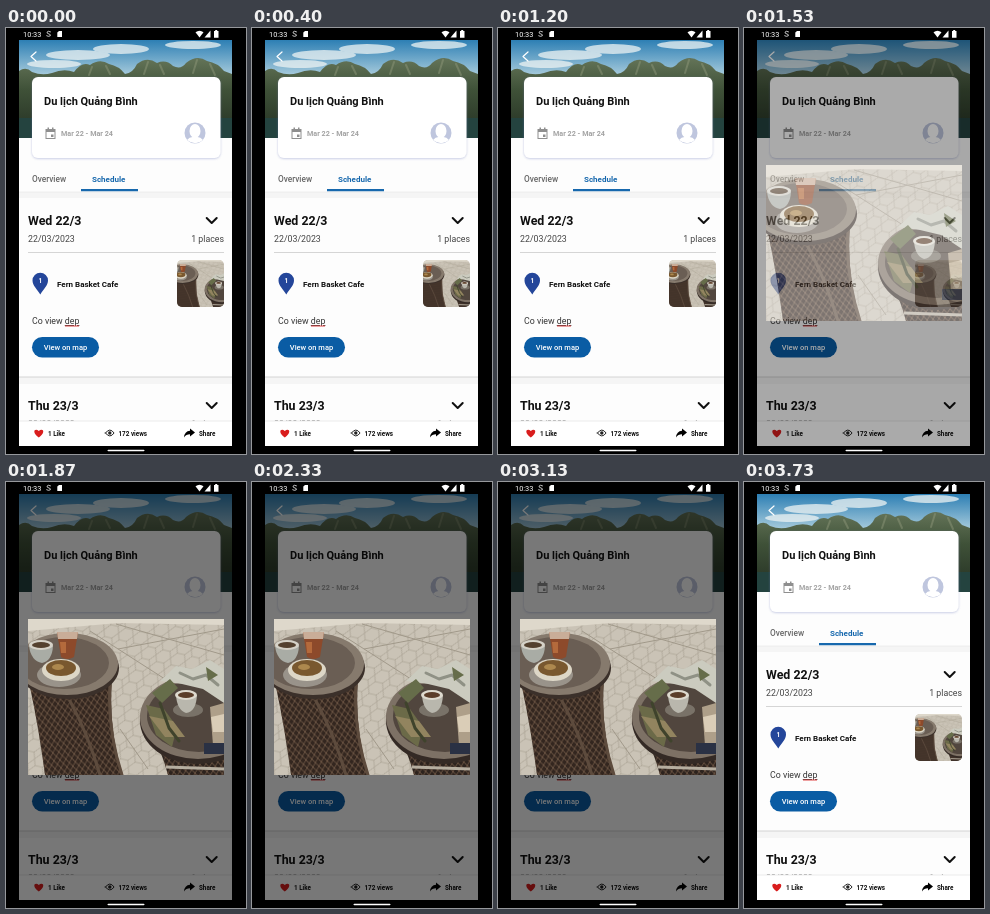
These frames come from a looping animation (240 by 426 pixels, 3.79 s). An HTML page:

```html
<!DOCTYPE html>
<html lang="vi">
<head>
<meta charset="utf-8">
<title>Trip schedule</title>
<style>
  html, body { margin: 0; width: 100%; height: 100%; overflow: hidden; background: #000; }
  svg { display: block; }
  body > svg { width: 100vw; height: 100vh; }
  text { font-family: Roboto, sans-serif; fill: #111; }
  .bold { font-weight: 700; }
  .gray { fill: #666; }
  .line { fill: none; stroke-linecap: round; stroke-linejoin: round; }
</style>
</head>
<body>
<svg viewBox="0 0 240 426">
  <defs>
    <linearGradient id="sky" x2="0" y2="1">
      <stop stop-color="#2d7fb4"/><stop offset=".4" stop-color="#b4d3e0"/>
    </linearGradient>
    <linearGradient id="hill" x2="0" y2="1">
      <stop stop-color="#647458"/><stop offset=".4" stop-color="#3f5138"/><stop offset="1" stop-color="#232f22"/>
    </linearGradient>
    <filter id="shadow" x="-10%" y="-10%" width="120%" height="125%">
      <feDropShadow dx="0" dy=".7" stdDeviation="1" flood-color="#7480c0" flood-opacity=".45"/>
    </filter>
    <pattern id="tiles" width="16" height="12" patternUnits="userSpaceOnUse" patternTransform="skewX(-18) rotate(12)">
      <path d="M0 6L4 0H12L16 6L12 12H4Z" fill="none" stroke="#a39b8c" stroke-width=".6"/>
    </pattern>
    <pattern id="weave" width="6" height="8" patternUnits="userSpaceOnUse" patternTransform="rotate(-8)">
      <path d="M0 0L6 8M6 0L0 8" stroke="#6b5443" stroke-width="1"/>
    </pattern>
    <symbol id="photo" viewBox="0 0 196 156" preserveAspectRatio="xMidYMid slice">
      <path d="M0 0H196V156H0Z" fill="#cac3b6"/>
      <path d="M0 0H196V156H0Z" fill="url(#tiles)"/>
      <path d="M0 0H196V6L90 4L0 12Z" fill="#ded8cb"/>
      <path d="M88 5L196 36M62 12L140 62M90 30L196 10M92 110L120 150" stroke="#a1998a" fill="none"/>

      <path d="M2 68Q11 110 17 156H95Q80 112 84 58Z" fill="#33261f"/>
      <path d="M2 68Q11 110 17 156H95Q80 112 84 58Z" fill="url(#weave)"/>
      <path d="M42 82Q60 115 72 156M82 66Q79 110 94 156" class="line" stroke="#5d4b3d" stroke-width="3"/>
      <ellipse cx="40" cy="49" rx="51" ry="31" fill="#3b302a"/>
      <ellipse cx="39" cy="45" rx="51" ry="31" fill="#867a6d"/>
      <ellipse cx="36" cy="44" rx="45" ry="26" fill="#6a5e54"/>
      <path d="M1 27H25Q24 42 14 44Q3 42 1 27Z" fill="#a9aca5"/>
      <ellipse cx="13" cy="26" rx="12" ry="5" fill="#d5d2c8"/><ellipse cx="13" cy="26" rx="9" ry="3" fill="#54412f"/>
      <path d="M29 13H50L46 38Q39 42 33 38Z" fill="#8d4a2b"/>
      <path d="M29 13H50L49 20H30Z" fill="#c9ad98"/><path d="M32 23H38V34H33Z" fill="#b46a3c"/>
      <ellipse cx="31" cy="56" rx="22" ry="12" fill="#99938a"/>
      <ellipse cx="33" cy="51" rx="19" ry="11" fill="#ddd7c7"/>
      <ellipse cx="33" cy="49" rx="15" ry="8" fill="#79582f"/><ellipse cx="30" cy="48" rx="6" ry="3" fill="#ad884e"/>

      <path d="M122 112Q134 132 140 156H196V105Z" fill="#2d231e"/>
      <path d="M122 112Q134 132 140 156H196V105Z" fill="url(#weave)"/>
      <ellipse cx="170" cy="102" rx="58" ry="43" fill="#342a25"/>
      <ellipse cx="170" cy="98" rx="58" ry="42" fill="#7d7165"/>
      <ellipse cx="171" cy="97" rx="52" ry="36" fill="#51463e"/>
      <path d="M132 62L148 47L164 50L182 41L196 50V84L175 70L154 65Z" fill="#cbcbbf"/>
      <path d="M152 54L165 60L178 56L190 66" class="line" stroke="#8f9185" stroke-width="3"/>
      <path d="M124 74L142 60L150 69L134 84ZM178 48L190 56L180 62Z" fill="#666d4a"/>
      <path d="M118 86L136 90L149 108L144 128L128 116Z" fill="#6b6a48"/>
      <path d="M121 97L145 102L157 118L137 118Z" fill="#92845f"/>
      <path d="M132 84L141 109L151 122" class="line" stroke="#3f432c" stroke-width="3"/>
      <ellipse cx="160" cy="91" rx="15" ry="7" fill="#797268"/>
      <path d="M148 76H169Q168 93 158 94Q149 91 148 76Z" fill="#b9b7ad"/>
      <ellipse cx="158" cy="76" rx="11" ry="5" fill="#dedacf"/><ellipse cx="158" cy="76" rx="8" ry="3" fill="#5b3d29"/>
      <path d="M182 88L196 84V126H185Z" fill="#ae9f89"/><path d="M183 98L196 95V113H185Z" fill="#dacdb7"/>
      <path d="M176 124H196V135H176Z" fill="#2a3144"/>
      <path d="M138 148L196 150" stroke="#b6aea0" stroke-width="3"/>
    </symbol>
    <clipPath id="header"><path d="M13 12H226V110H13Z"/></clipPath>
    <clipPath id="thumb"><rect x="171" y="232" width="47" height="47" rx="5"/></clipPath>
    <path id="chevron" class="line" d="M-5 -2.5L0 2.5L5 -2.5" stroke="#111" stroke-width="2"/>
  </defs>

  <path d="M0 0H240V426H0Z"/>
  <path d="M13 12H226V418H13Z" fill="#fdfdfd"/>

  <g clip-path="url(#header)">
    <path d="M13 12H226V110H13Z" fill="url(#sky)"/>
    <g fill="#edf3f3" opacity=".75">
      <ellipse cx="72" cy="27" rx="32" ry="5"/><ellipse cx="115" cy="21" rx="28" ry="5"/>
      <ellipse cx="48" cy="36" rx="27" ry="4"/><ellipse cx="187" cy="17" rx="28" ry="4"/>
    </g>
    <path d="M13 43Q20 38 26 44Q36 48 46 45Q58 40 68 44Q76 33 84 37Q94 30 103 36Q113 38 119 46Q127 45 131 36Q141 28 151 35Q160 31 167 38Q175 42 180 35Q191 26 201 33Q212 35 218 43L226 46V110H13Z" fill="url(#hill)"/>
    <path d="M86 39L83 47M100 38L104 46M142 34L138 46M154 37L158 46M191 32L187 45M204 36L209 47" class="line" stroke="#99a083" stroke-width="2" opacity=".4"/>
    <path d="M13 90H226V110H13Z" fill="#24433f"/>
  </g>
  <path d="M30 24L25 28.5L30 33" class="line" stroke="#fff" stroke-width="1.2"/>

  <rect x="26" y="49" width="188.500" height="81" rx="6" fill="#fff" filter="url(#shadow)"/>
  <text x="38" y="77" class="bold" font-size="11">Du lịch Quảng Bình</text>
  <g fill="#8f8f8f">
    <path fill-rule="evenodd" d="M39.500 101H41.500V99.500H43V101H46V99.500H47.500V101H49.500V111H39.500ZM40.500 104V110H48.500V104Z"/>
    <path d="M45 106.500H47.500V109H45Z"/>
  </g>
  <text x="55" y="108" class="bold" font-size="7.2" style="fill:#a3a3a3">Mar 22 - Mar 24</text>
  <circle cx="189" cy="105" r="10.500" fill="#bfc6de"/>
  <ellipse cx="189" cy="103" rx="5.500" ry="7" fill="#fff"/>
  <path d="M181 112Q183.500 109 186.500 109H191.500Q194.500 109 197 112Q189.500 118.500 181 112Z" fill="#fff"/>

  <text x="26" y="154" font-size="8.3" class="gray" font-weight="500">Overview</text>
  <text x="86" y="154" font-size="8" class="bold" style="fill:#1768ad">Schedule</text>
  <path d="M13 164H226V170H13Z" fill="#f5f5f5"/>
  <path d="M13 164H226" stroke="#e4e4e4" stroke-width=".6"/>
  <path d="M75 161H132V163.200H75Z" fill="#1768ad"/>

  <text x="22" y="197" class="bold" font-size="12.400">Wed 22/3</text>
  <use href="#chevron" x="205.700" y="192.500"/>
  <text x="22" y="214" font-size="8.800" style="fill:#444">22/03/2023</text>
  <text x="218" y="214" font-size="8.800" text-anchor="end" style="fill:#444">1 places</text>
  <path d="M22 224.500H218" stroke="#ccc" stroke-width=".8"/>

  <path d="M34.300 266.500C31 261 26.500 257.500 26.500 252.500A7.700 7.700 0 0 1 42 252.500C42 257.500 37.500 261 34.300 266.500Z" fill="#24469a"/>
  <text x="34.300" y="255" text-anchor="middle" class="bold" font-size="6.500" style="fill:#fff">1</text>
  <text x="51" y="259" class="bold" font-size="8">Fern Basket Cafe</text>
  <g clip-path="url(#thumb)"><use href="#photo" x="171" y="232" width="47" height="47"/></g>

  <text x="26" y="296" font-size="8.800" style="fill:#333">Co view <tspan text-decoration="underline">dep</tspan></text>
  <path d="M59 298H73" stroke="#d33" stroke-width=".9"/>
  <rect x="26" y="309" width="67" height="20.500" rx="10.250" fill="#0a5ca4"/>
  <text x="59.500" y="322" text-anchor="middle" font-size="7.500" font-weight="500" style="fill:#fff">View on map</text>

  <path d="M13 349H226V356H13Z" fill="#f5f5f5"/>
  <path d="M13 349H226" stroke="#d0d0d0" stroke-width=".9"/>
  <text x="22" y="382" class="bold" font-size="12.400">Thu 23/3</text>
  <use href="#chevron" x="205.700" y="377.500"/>
  <text x="22" y="399" font-size="8.800" style="fill:#888">23/03/2023</text>
  <text x="218" y="399" font-size="8.800" text-anchor="end" style="fill:#888">1 places</text>

  <path d="M13 393H226V418H13Z" fill="#fff"/>
  <path d="M13 393H226" stroke="#e2e2e2" stroke-width=".7"/>
  <path d="M32.800 409.500C25 404 29 399.500 32.800 403C36.600 399.500 40.600 404 32.800 409.500Z" fill="#d91d1d"/>
  <path d="M99.500 405Q103.800 399 108.100 405Q103.800 411 99.500 405Z" class="line" stroke="#222"/>
  <circle cx="103.800" cy="405" r="1.700" fill="#222"/>
  <path d="M184 400.500L189 404.500L184 408.500V406.200Q180 406.200 178 409.500Q178.500 403.200 184 402.800Z"/>
  <g class="bold" font-size="6.300">
    <text x="42" y="407.500">1 Like</text><text x="112.500" y="407.500">172 views</text><text x="193" y="407.500">Share</text>
  </g>

  <g id="modal">
    <path d="M13 12H226V418H13Z" opacity=".53"/>
    <use href="#photo" x="22" y="137" width="196" height="156"/>
  </g>

  <text x="17" y="9" font-size="7.400" style="fill:#fff">10:33</text>
  <g fill="#fff">
    <path d="M44.500 3.800Q42 2.500 41 4.200Q40.800 5.500 43 6Q45 6.500 44.300 7.800Q42.500 9 40.700 7.800" class="line" stroke="#ddd" stroke-width=".9"/>
    <path d="M53 3H56V9H51.300V4.600Z"/>
    <path d="M189.500 4.300Q193.500 1 197.500 4.300L193.500 9.500Z"/>
    <path d="M204.500 2.500V9.500H198.500Z"/>
    <path d="M208 3H209.200V2H211.200V3H212.500V9.700H208Z"/>
    <rect x="101.500" y="421.700" width="37" height="1.600" rx=".8"/>
  </g>
</svg>
<script>
  const LOOP = 3790, FADE = 160, OPEN = 1430, CLOSE = 3360;
  const modal = document.getElementById('modal');
  const ramp = (t, start) => Math.min(1, Math.max(0, (t - start) / FADE));
  const startTime = performance.now();

  function draw(now) {
    const t = Math.max(0, now - startTime) % LOOP;
    modal.setAttribute('opacity', ramp(t, OPEN) - ramp(t, CLOSE));
    requestAnimationFrame(draw);
  }
  draw(startTime);
</script>
</body>
</html>
```
